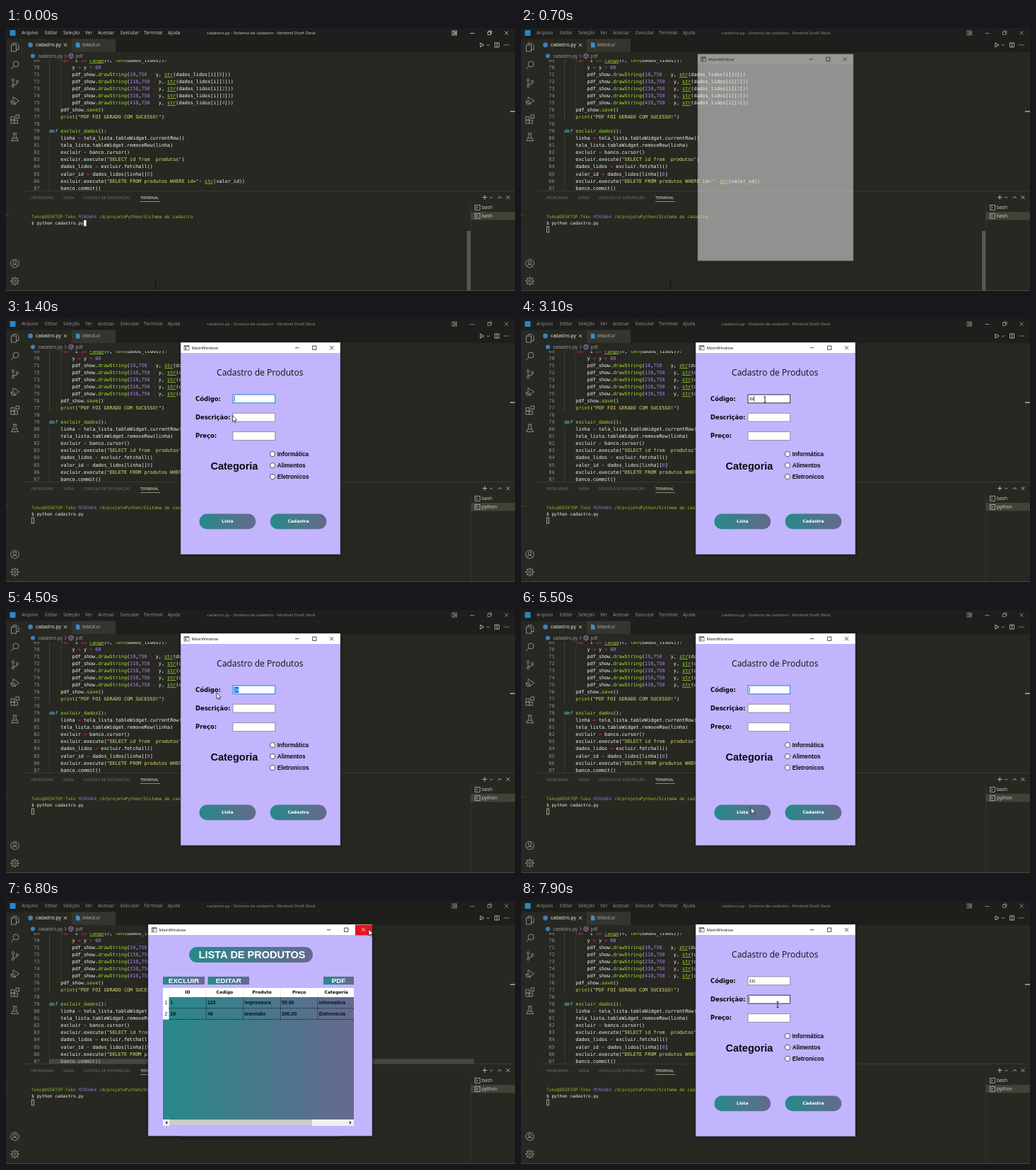
An HTML page with a canvas for the animation above (8000 ms loop, 720 px wide and 372 px high).

```html
<!DOCTYPE html>
<html lang="pt">
<head>
<meta charset="utf-8">
<title>Cadastro</title>
<style>
html, body { margin: 0; width: 100%; height: 100%; overflow: hidden; background: #272822; }
canvas { display: block; }
</style>
</head>
<body>
<canvas id="stage" width="720" height="372"></canvas>
<script>
const W = 720, H = 372, LOOP = 8000, TICK = 100;
const UI = '"Open Sans", "Noto Sans", sans-serif';
const MONO = '"DejaVu Sans Mono", monospace';
const ARIAL = '"Liberation Sans", sans-serif';
const WIDE = '"DejaVu Sans", sans-serif';
const LILAC = '#c2b5fe', TEAL = '#27898a', SLATE = '#66698c';

const screen = document.getElementById('stage').getContext('2d');
const layer = Object.assign(document.createElement('canvas'), { width: W, height: H });
const buffer = layer.getContext('2d');
let g = screen;

function rect(x, y, w, h, fill) {
  g.fillStyle = fill;
  g.fillRect(x, y, w, h);
}

function frame(x, y, w, h, color, lw = 0.8) {
  g.strokeStyle = color;
  g.lineWidth = lw;
  g.strokeRect(x, y, w, h);
}

// y is the middle of the capitals
function text(s, x, y, size, color, family = UI, style = '', align = 'left') {
  g.font = `${style} ${size}px ${family}`;
  g.textAlign = align;
  g.fillStyle = color;
  g.fillText(s, x, y + size * 0.36);
}

function line(color, lw, ...pts) {
  g.strokeStyle = color;
  g.lineWidth = lw;
  g.beginPath();
  for (let i = 0; i < pts.length; i += 2) g.lineTo(pts[i], pts[i + 1]);
  g.stroke();
}

function disc(x, y, r, fill, stroke, lw = 0.8) {
  g.beginPath();
  g.arc(x, y, r, 0, Math.PI * 2);
  if (fill) { g.fillStyle = fill; g.fill(); }
  if (stroke) { g.strokeStyle = stroke; g.lineWidth = lw; g.stroke(); }
}

function cross(x, y, r, color, lw = 0.8) {
  line(color, lw, x - r, y - r, x + r, y + r);
  line(color, lw, x + r, y - r, x - r, y + r);
}

function blend(x, w) {
  const grad = g.createLinearGradient(x, 0, x + w, 0);
  grad.addColorStop(0, TEAL);
  grad.addColorStop(1, SLATE);
  return grad;
}

function pill(x, y, w, h) {
  g.fillStyle = blend(x, w);
  g.beginPath();
  g.roundRect(x, y, w, h, h / 2);
  g.fill();
}

/* ---------- editor ---------- */

const CODE = [
  '    for  i in range(0, len(dados_lidos)):',
  '        y = y + 60',
  ...[0, 1, 2, 3, 4].map(i =>
    `        pdf_show.drawString(${i ? i : ''}10,750 - y, str(dados_lidos[i][${i}]))`),
  '    pdf_show.save()',
  '    print("PDF FOI GERADO COM SUCESSO!")',
  '',
  'def excluir_dados():',
  '    linha = tela_lista.tableWidget.currentRow()',
  '    tela_lista.tableWidget.removeRow(linha)',
  '    excluir = banco.cursor()',
  '    excluir.execute("SELECT id from  produtos")',
  '    dados_lidos = excluir.fetchall()',
  '    valor_id = dados_lidos[linha][0]',
  '    excluir.execute("DELETE FROM produtos WHERE id="+ str(valor_id))',
  '    banco.commit()'
];
const TOKENS = [
  [/"[^"]*"/y, '#e6db74'],
  [/def\b/y, '#66d9ef', 'italic'],
  [/(for|in)\b/y, '#f92672'],
  [/(str|range)\b/y, '#a6e22e', '', true],
  [/(print|len|(?<=pdf_show\.|def )\w+)(?=\()/y, '#a6e22e'],
  [/\d+/y, '#ae81ff'],
  [/[-+=]/y, '#f92672'],
  [/\w+|[^\w\s]/y, '#f8f8f2']
];
const CODE_SIZE = 6.77, CHAR = CODE_SIZE * 0.602, CODE_X = 61, CODE_Y = 45.6, ROW = 10.03;

function codeLine(src, y) {
  let col = 0;
  while (col < src.length) {
    let step = 1;
    for (const [re, color, style = '', under] of TOKENS) {
      re.lastIndex = col;
      const m = re.exec(src);
      if (!m) continue;
      const x = CODE_X + col * CHAR;
      step = m[0].length;
      text(m[0], x, y, CODE_SIZE, color, MONO, style);
      if (under) rect(x, y + 3.6, step * CHAR, 0.7, color);
      break;
    }
    col += step;
  }
}

function codePane() {
  g.save();
  g.beginPath();
  g.rect(25, 45, 695, 185);
  g.clip();
  rect(61, 45, 0.6, 86, '#55564f');
  rect(61, 151, 0.6, 80, '#464741');
  rect(77.2, 51, 0.6, 60, '#464741');
  CODE.forEach((src, i) => {
    const y = CODE_Y + i * ROW;
    text(69 + i, 47.5, y, CODE_SIZE, '#90908a', MONO, '', 'right');
    codeLine(src, y);
  });
  g.restore();
  rect(713, 117.5, 7, 1.2, '#d0d0ca');
}

function activityBar() {
  const c = '#8b8c86', lw = 1;
  frame(7.5, 24, 7, 9, c, lw);
  line(c, lw, 10, 24, 10, 21.5, 15, 21.5, 18, 24.5, 18, 30.5, 14.5, 30.5);
  disc(14, 51, 4, null, c, lw);
  line(c, lw, 11, 54, 7, 58.5);
  disc(10, 73.5, 1.7, null, c, lw);
  disc(10, 82, 1.7, null, c, lw);
  disc(16, 76, 1.7, null, c, lw);
  line(c, lw, 10, 75.2, 10, 80.3);
  line(c, lw, 16, 77.7, 15, 79.5, 10.5, 80);
  line(c, lw, 10, 102, 10, 97.5, 18.5, 103, 13, 107);
  disc(10, 105.5, 2.6, null, c, lw);
  line(c, lw, 6, 103, 14, 108.5);
  frame(7, 125.5, 4.7, 4.7, c, lw);
  frame(7, 130.2, 4.7, 4.7, c, lw);
  frame(11.7, 130.2, 4.7, 4.7, c, lw);
  frame(14, 123, 4.5, 4.5, c, lw);
  line(c, lw, 9.5, 149, 15.5, 149);
  line(c, lw, 11, 149, 11, 153, 7.5, 159.5, 17.5, 159.5, 14, 153, 14, 149);
  line(c, lw, 9.5, 156, 15.5, 156);
  disc(12.5, 333, 5.8, null, c, lw);
  disc(12.5, 331.3, 2.2, null, c, lw);
  line(c, lw, 8.6, 337, 10.5, 334.5, 14.5, 334.5, 16.4, 337);
  disc(12.5, 358, 1.8, null, c, lw);
  disc(12.5, 358, 4.3, null, c, lw);
  for (let i = 0; i < 8; i++) {
    const dx = Math.cos(i * Math.PI / 4), dy = Math.sin(i * Math.PI / 4);
    line(c, 1.6, 12.5 + 4.3 * dx, 358 + 4.3 * dy, 12.5 + 6.2 * dx, 358 + 6.2 * dy);
  }
  rect(0, 264, 4, 0.7, '#55564f');
}

function titleBar(active) {
  const c = active ? '#cfcfca' : '#92938e';
  rect(0, 0, W, 15.5, '#1e1f1c');
  rect(5.5, 3, 8, 8, '#2489ca');
  [['Arquivo', 22], ['Editar', 55], ['Seleção', 81], ['Ver', 112], ['Acessar', 130],
    ['Executar', 162], ['Terminal', 195], ['Ajuda', 229]]
    .forEach(([s, x]) => text(s, x, 7, 6.5, c));
  text('cadastro.py - Sistema de cadastro - Nimbrel Draft Desk', 284, 7, 6.05, c);
  frame(631, 4, 2.6, 6, c);
  frame(635, 4, 2.4, 2.4, c);
  frame(635, 7.6, 2.4, 2.4, c);
  line(c, 0.9, 656.5, 7.5, 662.5, 7.5);
  frame(681.5, 5.5, 4, 4, c);
  line(c, 0.8, 683, 5.5, 683, 4, 687, 4, 687, 8, 685.5, 8);
  cross(708, 7, 2.6, c);
}

function tabs() {
  const c = '#c5c5c0';
  rect(25, 15.5, 695, 18.5, '#1e1f1c');
  rect(25, 15.5, 67, 18.5, '#272822');
  rect(92.5, 15.5, 62.5, 18.5, '#34352f');
  disc(34.5, 24, 3.4, '#3f7fb8');
  text('cadastro.py', 42, 24, 6.65, '#f8f8f2');
  cross(84, 24, 2.2, '#d8d8d2');
  g.fillStyle = '#3f8fc6';
  g.beginPath();
  [[99, 20.5], [102.5, 20.5], [104.5, 22.5], [104.5, 27.5], [99, 27.5]].forEach(p => g.lineTo(...p));
  g.fill();
  text('telacd.ui', 108, 24, 6.65, '#b4b4ae', UI, 'italic');
  line(c, 0.9, 671, 21, 676, 24, 671, 27, 671, 21);
  line(c, 0.7, 680, 23.3, 682, 25, 684, 23.3);
  frame(691.5, 21, 6, 6, c);
  line(c, 0.8, 694.5, 21, 694.5, 27);
  [705, 708, 711].forEach(x => disc(x, 24, 0.7, c));

  const b = '#a2a29c';
  disc(38, 39.5, 3.1, '#3f7fb8');
  text('cadastro.py', 45.5, 39.5, 6.4, b);
  line(b, 0.8, 83, 37.2, 85.4, 39.5, 83, 41.8);
  line('#b180d7', 0.9, 92, 36, 95, 37.7, 95, 41.3, 92, 43, 89, 41.3, 89, 37.7, 92, 36);
  line('#b180d7', 0.8, 89, 37.7, 92, 39.4, 95, 37.7);
  line('#b180d7', 0.8, 92, 39.4, 92, 43);
  text('pdf', 98.5, 39.5, 6.4, b);
}

function panel(t) {
  const c = '#c5c5c0', dim = '#75766f';
  rect(25, 230, 695, 0.7, '#414339');
  [['PROBLEMAS', 36], ['SAÍDA', 81], ['CONSOLE DE DEPURAÇÃO', 109]]
    .forEach(([s, x]) => text(s, x, 240, 5.45, dim));
  text('TERMINAL', 190, 240, 5.45, '#f0f0ea');
  rect(190, 245, 28, 0.8, '#a9a38c');

  line(c, 0.9, 674, 239.5, 680.5, 239.5);
  line(c, 0.9, 677.2, 236.2, 677.2, 242.8);
  line(c, 0.8, 684.3, 238.8, 686.3, 240.6, 688.3, 238.8);
  line(c, 0.9, 695.8, 241, 698.3, 238.3, 700.8, 241);
  cross(710, 239.5, 2.4, c);

  rect(657, 248, 0.7, 124, '#3b3c35');
  rect(657.7, 260, 62.3, 11.5, '#414339');
  ['bash', t < 900 ? 'bash' : 'python'].forEach((s, i) => {
    const y = 254 + i * 12;
    frame(663.3, y - 3.5, 7, 7, c, 0.7);
    line(c, 0.8, 665, y - 1.6, 667, y, 665, y + 1.6);
    text(s, 673, y, 6.65, '#d2d2cc');
  });

  const size = 6.13, cw = 3.69;
  const term = (s, col, y, color) => text(s, 36 + col * cw, y, size, color, MONO);
  term('Teko@DESKTOP-Teko', 0, 267, '#86b42b');
  term('MINGW64', 18, 267, '#8c6bc8');
  term('/d/projetoPython/Sistema de cadastro', 26, 267, '#b3b42b');
  term('$ python cadastro.py', 0, 276, '#f0f0ea');
  if (t < 300) rect(110, 271.8, 3.6, 8.4, '#f0f0ea');
  else if (t < 700) rect(36.2, 280.8, 3.6, 8.4, '#f0f0ea');
  else frame(36.4, 281, 3.2, 8, '#d8d8d2', 0.7);
  if (t < 1000) rect(652, 287, 5, 84, '#575852');
  rect(0, 371, W, 1, '#46473f');
}

function editor(t) {
  rect(0, 0, W, H, '#272822');
  titleBar(t < 700);
  tabs();
  codePane();
  if (t >= 6400 && t < 7100) rect(61, 223.5, 601, 6.5, 'rgba(121,121,121,.4)');
  activityBar();
  panel(t);
}

/* ---------- application windows ---------- */

function shell(x, y, w, h, body, hotClose) {
  g.save();
  g.shadowColor = 'rgba(0,0,0,.5)';
  g.shadowBlur = 6;
  rect(x, y, w, h, body);
  g.restore();
  rect(x, y, w, 15, '#fff');
  frame(x + 5, y + 4.8, 7, 6.2, '#555', 0.7);
  rect(x + 5, y + 4.8, 7, 1.5, '#555');
  rect(x + 6, y + 7.3, 2.3, 3, '#4f9a7d');
  text('MainWindow', x + 15.5, y + 8, 6.15, '#111');
  const r = x + w, cy = y + 7.7;
  line('#222', 0.8, r - 64, cy, r - 58.5, cy);
  frame(r - 39.3, cy - 2.6, 5.2, 5.2, '#222');
  if (hotClose) rect(r - 24, y + 0.5, 24, 15, '#e81123');
  cross(r - 12.4, cy, 2.6, hotClose ? '#fff' : '#222');
  frame(x, y, w, h, 'rgba(70,70,80,.6)', 0.7);
}

const FIELDS = [107, 133.2, 159.6];

// focus is the index of the active field, or -1 for none
function formState(t) {
  let code = '', focus = 0;
  if (t >= 2600 && t < 4900) code = t < 2800 ? '3' : '39';
  if (t >= 7300) code = '1'.repeat(Math.min(3, Math.floor((t - 7200) / 100)));
  if (t >= 5800 && t < 7200) focus = -1;
  if (t >= 7800) focus = 1;
  return { code, focus };
}

function formWindow(t, m) {
  shell(247, 33, 226, 300, LILAC);
  text('Cadastro de Produtos', 298, 76, 12.1, '#111');
  ['Código:', 'Descrição:', 'Preço:'].forEach((s, i) =>
    text(s, 268, 113 + i * 26.2, 8.4, '#050505', WIDE, 'bold'));

  const { code, focus } = formState(t);
  FIELDS.forEach((y, i) => {
    rect(321, y, 59.7, 11.8, '#fff');
    const hover = overField(m.x, m.y) === i;
    frame(321, y, 59.7, 11.8, hover ? '#222' : i === focus ? '#0078d7' : '#8a8794', 0.9);
  });
  const width = code.length * 3.4, from = Math.max(322.5, m.x);
  const selecting = t >= 4000 && t < 4900 && from < 322.5 + width;
  if (selecting) rect(from, 108.8, 322.5 + width - from, 8.4, '#0078d7');
  text(code, 322.5, 113, 6.1, selecting ? '#fff' : '#111', ARIAL);
  if (!selecting && focus >= 0) {
    const cx = focus ? 322.6 : 322.8 + width;
    rect(cx, FIELDS[focus] + 1.8, 0.7, 8.2, '#111');
  }

  text('Categoria', 289.5, 207.5, 14.5, '#0a0a12', ARIAL, 'bold');
  ['Informática', 'Alimentos', 'Eletronicos'].forEach((s, i) => {
    const y = 191 + i * 16;
    disc(377, y, 3.6, '#fff', '#333', 0.8);
    text(s, 383.7, y, 8.25, '#0a0a12', ARIAL, 'bold');
  });
  [['Lista', 273.5], ['Cadastra', 373.7]].forEach(([s, x]) => {
    pill(x, 275.6, 79.7, 21.6);
    text(s, x + 39.8, 286.3, 6, '#fff', WIDE, 'bold', 'center');
  });
}

function blankWindow() {
  shell(247, 33, 226, 300, '#f0f0f0');
}

function listWindow(hot) {
  shell(201, 33, 317, 299.5, LILAC, hot);
  pill(259, 65, 175, 22);
  text('LISTA DE PRODUTOS', 348, 76, 14.5, '#fff', ARIAL, 'bold', 'center');
  [['EXCLUIR', 222, 59], ['EDITAR', 285.5, 58.5], ['PDF', 449, 43]].forEach(([s, x, w]) => {
    rect(x, 107, w, 11.2, blend(x, w));
    text(s, x + w / 2, 112.7, 9.9, '#fff', ARIAL, 'bold', 'center');
  });

  const L = 222, R = 492, x0 = 230.5, cw = 52.6;
  rect(L, 123, R - L, 195, blend(L, R - L));
  rect(L, 123, R - L, 13, '#fff');
  rect(L, 136, x0 - L, 31.6, '#fff');
  ['ID', 'Codigo', 'Produto', 'Preço', 'Categoria'].forEach((s, i) => {
    text(s, x0 + (i + 0.5) * cw, 129.3, 6.1, '#0a0a0a', WIDE, 'bold', 'center');
    rect(x0 + i * cw, 124, 0.5, 11, '#ddd');
  });
  const rows = [['1', '123', 'impressora', '50.00', 'informatica'],
    ['16', '49', 'televisão', '300.00', 'Eletronicos']];
  rows.forEach((row, r) => {
    const y = 143.7 + r * 15.8;
    text(r + 1, 226.2, y, 6.5, '#111', ARIAL, '', 'center');
    row.forEach((s, i) => text(s, x0 + i * cw + 1.8, y, 6.95, '#0a1014', ARIAL, 'bold'));
  });
  g.setLineDash([2, 1.2]);
  [151.7, 167.5].forEach(y => line('#101820', 0.8, x0, y, R, y));
  for (let i = 1; i < 5; i++) line('#101820', 0.7, x0 + i * cw, 136, x0 + i * cw, 167.5);
  g.setLineDash([]);

  rect(L, 309, R - L, 9, '#f0f0f0');
  rect(232, 309.4, 200, 8.2, '#cdcdcd');
  frame(232, 309.4, 200, 8.2, '#9a9a9a', 0.5);
  [[227, -1], [487, 1]].forEach(([x, d]) => {
    g.fillStyle = '#333';
    g.beginPath();
    g.moveTo(x + 1.6 * d, 313.5);
    g.lineTo(x - 1.2 * d, 311);
    g.lineTo(x - 1.2 * d, 316);
    g.fill();
  });
}

// Draws a whole window as one translucent, scaled layer
function ghost(alpha, scale, cx, cy, draw) {
  buffer.clearRect(0, 0, W, H);
  g = buffer;
  draw();
  g = screen;
  g.save();
  g.globalAlpha = alpha;
  g.translate(cx, cy);
  g.scale(scale, scale);
  g.drawImage(layer, -cx, -cy);
  g.restore();
}

/* ---------- pointer ---------- */

const PATH = [
  [0, 211.5, 364], [800, 211.5, 364], [1300, 320.5, 136.5], [1600, 320.5, 136.5],
  [2100, 345, 114], [4000, 345, 114], [4400, 298, 117], [4900, 298, 117],
  [5600, 327, 289], [6000, 327, 289], [6600, 513, 40], [6900, 513, 40],
  [7200, 348, 114], [7500, 348, 114], [7800, 363, 146.5], [LOOP, 363, 146.5]
];

function pointerAt(t) {
  const i = PATH.findIndex(k => k[0] > t);
  const [t0, x0, y0] = PATH[i - 1], [t1, x1, y1] = PATH[i];
  const u = (t - t0) / (t1 - t0), e = u * u * (3 - 2 * u);
  return { x: x0 + (x1 - x0) * e, y: y0 + (y1 - y0) * e };
}

function overField(x, y) {
  return x > 321 && x < 381 ? FIELDS.findIndex(f => y > f && y < f + 14) : -1;
}

function pointer({ x, y }, listOpen) {
  const outside = x < 247 || x > 473 || y < 33 || y > 333;
  if (!listOpen && (outside || overField(x, y) >= 0)) {
    line('#0c0c0a', 0.9, x, y - 4, x, y + 4);
    [-4, 4].forEach(dy => line('#0c0c0a', 0.8, x - 1.6, y + dy, x + 1.6, y + dy));
    return;
  }
  g.beginPath();
  [[0, 0], [0, 8.8], [2, 7], [3.3, 10], [4.7, 9.4], [3.4, 6.5], [6.1, 6.3]]
    .forEach(([dx, dy]) => g.lineTo(x + dx, y + dy));
  g.closePath();
  g.fillStyle = '#fff';
  g.fill();
  g.strokeStyle = '#111';
  g.lineWidth = 0.7;
  g.stroke();
}

/* ---------- timeline ---------- */

function render(t) {
  const m = pointerAt(t), hot = t >= 6600;
  editor(t);
  if (t >= 800) formWindow(t, m);
  else if (t >= 700) ghost(0.53, 0.976, 360, 183, blankWindow);
  if (t >= 6000 && t < 6900) listWindow(hot);
  else if (t >= 5900 && t < 6000) ghost(0.68, 0.987, 359.5, 182.7, () => listWindow(false));
  else if (t >= 6900 && t < 7000) ghost(0.4, 0.96, 359.5, 182.7, () => listWindow(true));
  pointer(m, t >= 5900 && t < 7000);
}

const start = performance.now();
let last = -1;

function loop() {
  const t = Math.floor((performance.now() - start) % LOOP / TICK) * TICK;
  if (t !== last) render(last = t);
  requestAnimationFrame(loop);
}
loop();
</script>
</body>
</html>
```
